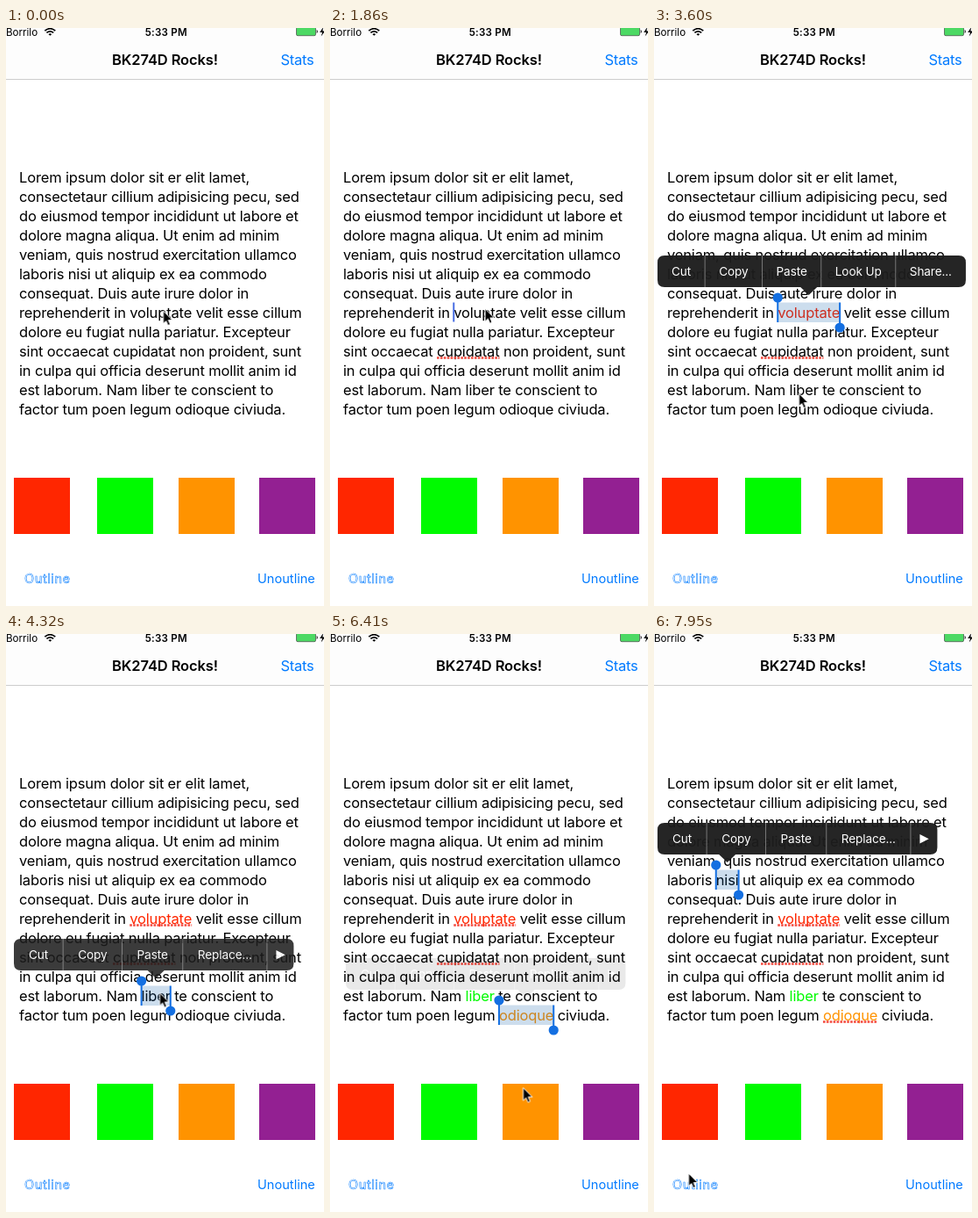
Recreate the animation shown at these times as an HTML page. Size 363 by 658 pixels, loop 8 s.

```html
<!DOCTYPE html>
<html lang="en">
<head>
<meta charset="utf-8">
<title>Text colours</title>
<style>
  html, body { margin: 0; width: 100%; height: 100%; overflow: hidden; background: #fff; }
  svg { display: block; width: 363px; height: 658px; }
  text { font-family: Inter, Roboto, sans-serif; font-optical-sizing: none; white-space: pre; }
  .body { font-size: 16.5px; letter-spacing: -.155px; }
  .title { font-size: 16.5px; font-weight: 600; letter-spacing: -.1px; text-anchor: middle; }
  .status { font-size: 11.6px; }
  .link { fill: #007aff; }
  .tight { letter-spacing: -.25px; }
  .button { font-size: 14.6px; }
  .hollow { fill: #fff; stroke: #007aff; stroke-width: .55px; letter-spacing: .55px; }
  .item { font-size: 13.6px; letter-spacing: -.1px; fill: #fff; text-anchor: middle; }
  .wave { stroke: #f4483c; stroke-width: 2.4; stroke-dasharray: 2.6 1.3; opacity: .85; }
  .caret { fill: #4a6fe3; }
  .grip { fill: #146fe1; }
  .shade { fill: #0054a6; fill-opacity: .2; }
</style>
</head>
<body>
<svg viewBox="0 0 363 658" xmlns="http://www.w3.org/2000/svg">
  <rect width="363" height="58" fill="#fdfdfd"/>
  <rect y="58" width="363" height="1" fill="#cdcdcd"/>
  <text class="status" x="0" y="8.6">Borrilo</text>
  <g fill="none" stroke="#000" stroke-width="1.7">
    <path d="M44.3 3.2Q50.3 -1.8 56.3 3.2M46.4 5.4Q50.3 2.2 54.2 5.4"/>
    <path d="M48.4 6.9Q50.3 5.6 52.2 6.9L50.3 8.8Z" fill="#000" stroke="none"/>
  </g>
  <text class="status" x="182.8" y="8.6" font-weight="600" text-anchor="middle" letter-spacing=".2">5:33 PM</text>
  <rect x="331.5" y="-1" width="22" height="9.7" rx="1.5" fill="#4cd964" stroke="#444" stroke-width=".7"/>
  <path d="M354.6 2V6Q356 5.5 356 4T354.6 2Z" fill="#333"/>
  <path d="M362 -1L358.2 5H361L359.8 9.5L364 3.5H361.4Z"/>
  <text class="title" x="181.5" y="42.2">BK274D Rocks!</text>
  <text class="body link tight" x="313.5" y="42.2">Stats</text>

  <g id="copy" class="body"></g>
  <g id="swatches"></g>
  <text class="button hollow" x="21" y="631.5">Outline</text>
  <text class="button link" x="287" y="631.5">Unoutline</text>

  <g id="marks"></g>
  <g id="menus"></g>
  <path id="cursor" d="M0 0V14.6L3.3 11.6L5.5 16.6L8 15.5L5.8 10.6H10.4Z" stroke="#fff" stroke-width="1"/>
</svg>
<script>
const LOOP = 8000, LINE = 22;
const RED = '#ff2600', GREEN = '#00fa00', ORANGE = '#ff9300', PURPLE = '#932092';
const $ = id => document.getElementById(id);

function add(parent, tag, attrs, text = '') {
  const el = document.createElementNS('http://www.w3.org/2000/svg', tag);
  for (const k in attrs) el.setAttribute(k, attrs[k]);
  el.textContent = text;
  return parent.appendChild(el);
}

// steps: [time, value]; the first and last values are held to the loop ends
function play(el, prop, steps, easing = 'linear') {
  const all = [[0, steps[0][1]], ...steps, [LOOP, steps[steps.length - 1][1]]];
  el.animate(all.map(([t, v]) => ({ offset: t / LOOP, [prop]: v, easing })),
    { duration: LOOP, iterations: Infinity });
}

const jump = (t, a, b) => [[t, a], [t, b]];
const show = (el, from, to) => play(el, 'opacity',
  [...jump(from, 0, 1), ...(to < LOOP ? jump(to, 1, 0) : [])]);

// Paragraph; words in brackets are marked later
`Lorem ipsum dolor sit er elit lamet,
consectetaur cillium adipisicing pecu, sed
do eiusmod tempor incididunt ut labore et
dolore magna aliqua. Ut enim ad minim
veniam, quis nostrud exercitation ullamco
laboris [nisi] ut aliquip ex ea commodo
consequat. Duis aute irure dolor in
reprehenderit in [voluptate] velit esse cillum
dolore eu fugiat nulla pariatur. Excepteur
sint occaecat [cupidatat] non proident, sunt
in culpa qui officia deserunt mollit anim id
est laborum. Nam [liber] te conscient to
factor tum poen legum [odioque] civiuda.`.split('\n').forEach((s, i) => {
  add($('copy'), 'text', { x: 15, y: 175.5 + LINE * i }).innerHTML =
    s.replace(/\[(\w+)\]/, '<tspan id="$1">$1</tspan>');
});

// Where a word stands, and the x of a letter in it
function locate(id, letter = 0) {
  const el = $(id), n = el.getNumberOfChars();
  const start = el.getStartPositionOfChar(0);
  return {
    x1: start.x, x2: el.getEndPositionOfChar(n - 1).x, base: start.y,
    caret: el.getStartPositionOfChar(letter).x
  };
}

[[9, RED], [104, GREEN], [197, ORANGE], [289, PURPLE]].forEach(([x, fill]) =>
  add($('swatches'), 'rect', { x, y: 512, width: 64, height: 64, fill }));

function wave(id, from) {
  const { x1, x2, base } = locate(id);
  show(add($('marks'), 'path', { class: 'wave', d: `M${x1} ${base + 2}H${x2}` }), from, LOOP);
}

function select({ x1, x2, base }, from, to) {
  const h = LINE + .5, top = base - 17, bottom = top + h;
  show(add($('marks'), 'rect', { class: 'shade', x: x1, y: top, width: x2 - x1, height: h }), from, to);
  const grip = add($('marks'), 'g', { class: 'grip' });
  [[x1, top - 5.5, top - 5], [x2, bottom + 6, top]].forEach(([x, cy, y]) => {
    add(grip, 'circle', { cx: x, cy, r: 5.6 });
    add(grip, 'rect', { x: x - 1, y, width: 2, height: h + 5 });
  });
  show(grip, from, to + 60);
}

// Cells are as wide as their labels plus padding
function menu(labels, x, { x1, x2, base }, more) {
  const g = add($('menus'), 'g', { transform: `translate(${x} ${base - 70.5})` });
  const plate = add(g, 'path', { fill: '#1d1d1d', 'fill-opacity': .96 });
  const pad = more ? 34 : 32, tip = (x1 + x2) / 2 - x;
  let w = 0;
  labels.forEach((label, i) => {
    if (i) add(g, 'rect', { x: w - .5, width: 1, height: 36, fill: '#777' });
    const text = add(g, 'text', { class: 'item', y: 23 }, label);
    const cell = text.getComputedTextLength() + pad;
    text.setAttribute('x', w + cell / 2);
    w += cell;
  });
  if (more) {
    add(g, 'rect', { x: w - .5, width: 1, height: 36, fill: '#777' });
    add(g, 'path', { d: `M${w + 10.5} 13v10.5l10.3 -5.3Z`, fill: '#fff' });
    w += 30.5;
  }
  plate.setAttribute('d', `M8 0H${w - 8}q8 0 8 8V28q0 8 -8 8H${tip + 9.5}` +
    `l-9.5 9l-9.5 -9H8q-8 0 -8 -8V8q0 -8 8 -8Z`);
  return g;
}

// Each edit: caret, selection, menu, then a tap on a swatch that dips the menu
const basic = ['Cut', 'Copy', 'Paste'];
const edits = [
  { id: 'voluptate', tap: 980, from: 2040, pick: 3000, to: 3980, color: RED, x: 4, wavy: true, wide: true },
  { id: 'liber', tap: 3980, from: 4090, pick: 4960, to: 5625, color: GREEN, x: 9 },
  { id: 'odioque', tap: 5625, from: 5850, pick: 6280, to: 7200, color: ORANGE, x: 18, letter: 5, wavy: true },
  { id: 'nisi', tap: 7200, from: 7320, to: LOOP, x: 4 }
];
wave('cupidatat', edits[0].tap);
for (const e of edits) {
  const at = locate(e.id, e.letter);
  show(add($('marks'), 'rect', { class: 'caret', x: at.caret - 1, y: at.base - 17, width: 2, height: LINE }),
    e.tap, e.from);
  select(at, e.from, e.to);
  if (e.wavy) wave(e.id, e.to);

  const fades = [[e.from + 50, 0], [e.from + 250, 1]];
  if (e.color) {
    play($(e.id), 'fill', jump(e.pick, '#000000', e.color));
    const p = e.pick;
    fades.push([p, 1], [p + 60, 0], [p + 110, 0], [p + 130, .1], [p + 190, .1], [p + 320, 1]);
    fades.push([e.to + 60, 1], [e.to + 140, 0]);
  }
  const labels = e.wide ? [...basic, 'Look Up', 'Share...'] : [...basic, 'Replace...'];
  play(menu(labels, e.x, at, !e.wide), 'opacity', fades);
}

// Pointer stops: [arrive, leave, x, y]
const stops = [
  [0, 500, 179.5, 322], [680, 1340, 163, 331], [1860, 2280, 177, 319.5],
  [2520, 2640, 92, 465], [2850, 3400, 56, 525], [3600, 3620, 165.5, 416],
  [3740, 4330, 175.5, 408.5], [4720, 5130, 136, 525], [5450, 5980, 236, 433],
  [6300, 6450, 220.5, 516.5], [6700, 7500, 78, 288], [7940, LOOP, 39.5, 614]
];
play($('cursor'), 'transform', stops.flatMap(([a, b, x, y]) => {
  const v = `translate(${x}px, ${y}px)`;
  return [[a, v], [b, v]];
}), 'ease-in-out');
</script>
</body>
</html>
```
